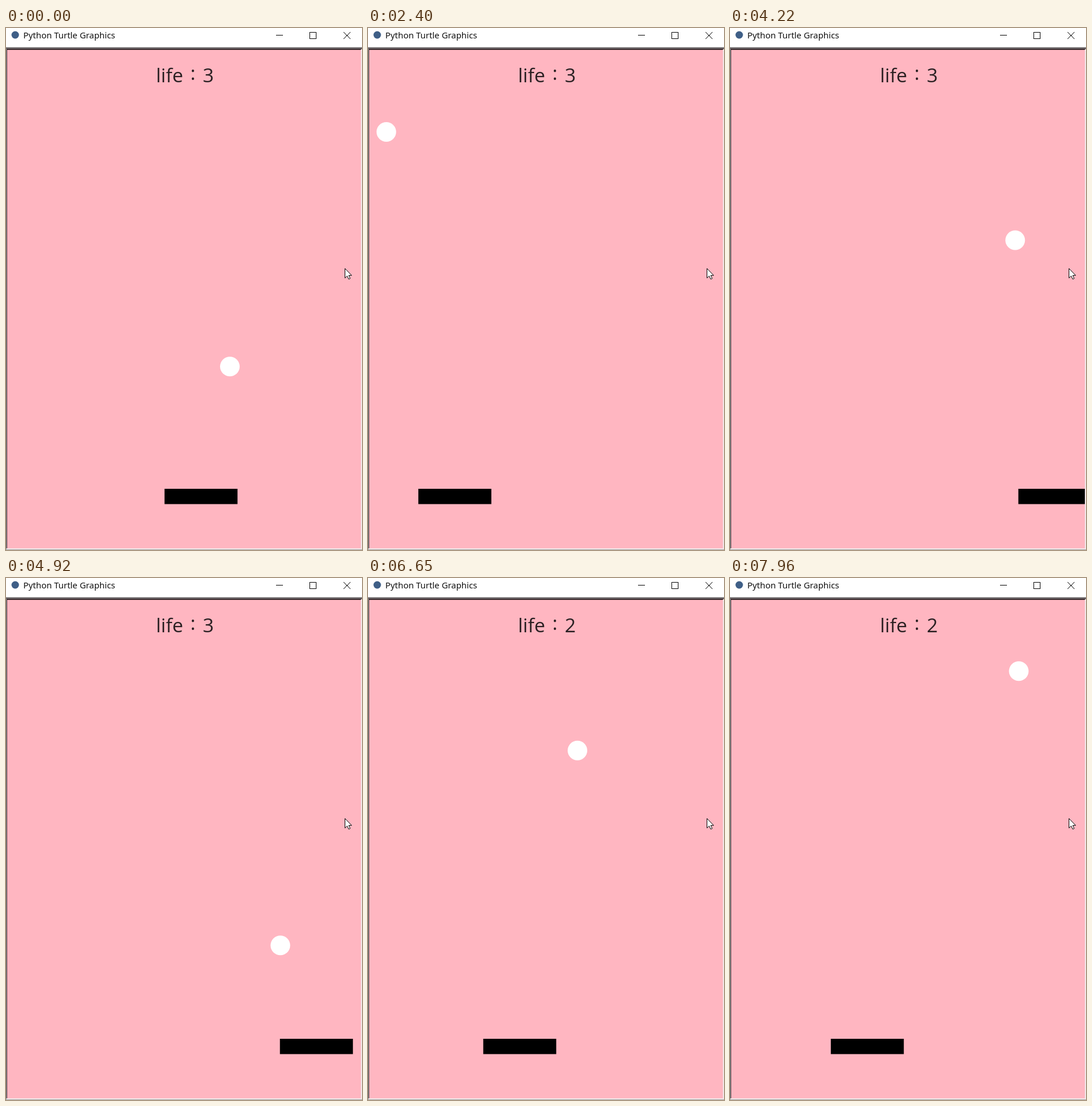
An HTML page that plays this animation: 617x904 px, repeating every 8000 ms.

```html
<!DOCTYPE html>
<html lang="en">
<head>
<meta charset="utf-8">
<title>Python Turtle Graphics</title>
<style>
  html, body { margin: 0; width: 100%; height: 100%; overflow: hidden; background: #fff; }
  svg { display: block; width: 617px; height: 904px; }
  .title { font: 14.9px "Noto Sans", "Open Sans", sans-serif; fill: #111; }
  .life { font: 33.5px "Open Sans", "Noto Sans", sans-serif; fill: #2a2022; }
  .crisp { shape-rendering: crispEdges; }
</style>
</head>
<body>
<svg viewBox="0 0 617 904">
  <defs><clipPath id="field"><rect x="2" y="38" width="613" height="863"/></clipPath></defs>
  <rect width="617" height="904" fill="#fff"/>
  <circle cx="16" cy="12" r="6.5" fill="#3f5f87"/>
  <text class="title" x="30" y="18">Python Turtle Graphics</text>
  <g fill="none" stroke="#000">
    <path class="crisp" d="M468 12.5h12M526.5 7.5h11v11h-11z"/>
    <path d="M585 7l12 12M597 7l-12 12"/>
  </g>

  <g class="crisp">
    <rect y="33" width="617" height="871" fill="#a0a0a0"/>
    <rect y="34" width="617" height="2" fill="#6e6669"/>
    <rect x="1" y="36" width="615" height="867" fill="#3b2c2f"/>
    <rect x="615" y="37" width="2" height="866" fill="#f3e6e8"/>
    <rect x="1" y="901" width="616" height="2" fill="#f3e6e8"/>
    <rect x="2" y="38" width="613" height="863" fill="#ffb6c1"/>
  </g>

  <text class="life" y="94"><tspan x="260">life</tspan><tspan x="324" y="90" text-anchor="middle">:</tspan><tspan id="lives" x="350.5" y="94" text-anchor="middle">3</tspan></text>
  <g clip-path="url(#field)">
    <rect id="paddle" x="-63.25" y="-13.25" width="126.5" height="26.5"/>
    <circle id="ball" r="17" fill="#fff"/>
  </g>
  <path d="M587.5 416.5v16.5l3.8-3.6 2.7 5.6 2.6-1.2-2.6-5.4h5z" fill="#fff" stroke="#000"/>
</svg>
<script>
  const LOOP = 8000, FRAME = 69.6, LEAD = 14;
  const RESUME = 1570, RESET = 6510;
  const MISS_FRAME = 73, RESET_FRAME = 74;
  const WALL_X = 245, WALL_Y = 345, PADDLE_Y = -270;
  const STRIDE = 5, FAST = 4.23, SLOW = 2;

  // Held arrow keys: first frame, last frame, where the paddle ends up
  const holds = [
    [0, 8.6, -170], [19, 37, 200], [50, 50.1, 180],
    [62, 72.4, -40], [77, 80.8, 70], [89.5, 95, -60]
  ];

  const byId = id => document.getElementById(id);
  const clamp = (value, low, high) => Math.min(Math.max(value, low), high);

  // The game pauses twice, so frames count from three starting times
  function frameAt(time) {
    const since = start => Math.floor((time - start + LEAD) / FRAME);
    if (time + LEAD < RESUME) return Math.min(since(0), 8);
    if (time + LEAD < RESET) return Math.min(9 + since(RESUME), MISS_FRAME);
    return RESET_FRAME + since(RESET);
  }

  // The ball slows down while a key is held
  function strides(frame) {
    const held = holds.reduce((sum, [from, to]) => sum + clamp(frame - from, 0, to - from), 0);
    return FAST * frame - (FAST - SLOW) * held;
  }

  function paddleAt(frame) {
    let x = 20;
    for (const [from, to, target] of holds) {
      x += (target - x) * clamp((frame - from) / (to - from), 0, 1);
    }
    return Math.round(x / 10) * 10;
  }

  // Reflects a straight path between -limit and +limit
  function bounce(value, limit) {
    const span = 4 * limit;
    const phase = (((value + limit) % span) + span) % span;
    return (phase < 2 * limit ? phase : span - phase) - limit;
  }

  // Turtle units, with the origin in the middle of the field
  function place(shape, x, y) {
    shape.setAttribute("transform", `translate(${313 + x * 1.25} ${473.75 - y * 1.25})`);
  }

  function draw(time) {
    const frame = frameAt(time);
    const fresh = frame >= RESET_FRAME;
    const travel = STRIDE * Math.round(strides(frame) - (fresh ? strides(RESET_FRAME) : 0));
    const x = bounce(fresh ? travel : 60 - travel, WALL_X);
    const y = WALL_Y - Math.abs(WALL_Y - (fresh ? 100 : -90) - travel);
    place(byId("ball"), x, Math.max(y, -WALL_Y));
    place(byId("paddle"), paddleAt(frame), PADDLE_Y);
    byId("lives").textContent = frame >= MISS_FRAME ? 2 : 3;
  }

  let start;
  function tick(now) {
    start ??= now;
    draw((now - start) % LOOP);
    requestAnimationFrame(tick);
  }
  draw(0);
  requestAnimationFrame(tick);
</script>
</body>
</html>
```
